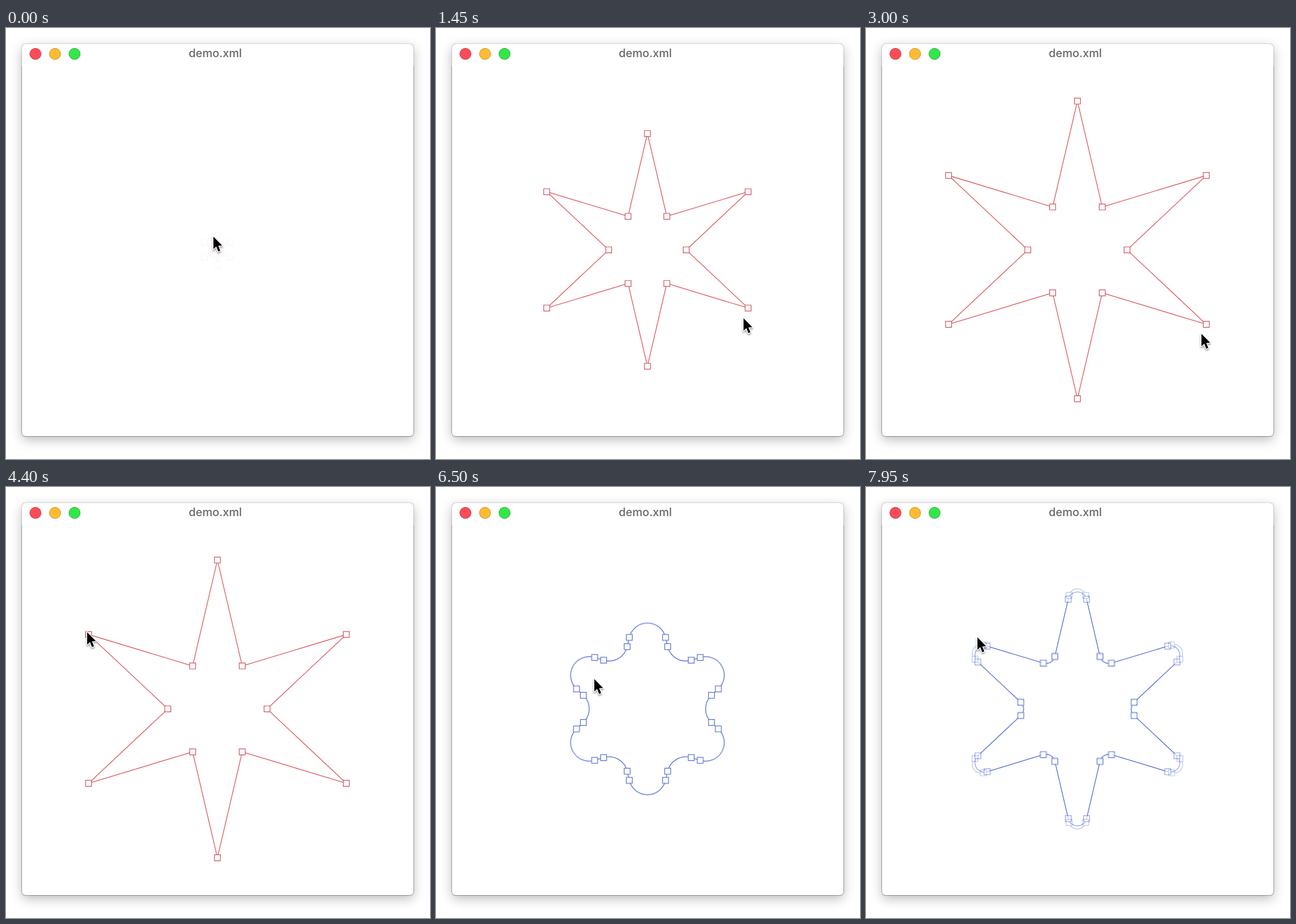
These frames come from a looping animation (742x754 px, 8000 ms). An HTML page:

```html
<!DOCTYPE html>
<html lang="en">
<head>
<meta charset="utf-8">
<title>Star editor</title>
<style>
  html, body { margin: 0; width: 100%; height: 100%; overflow: hidden; background: #fff; }
  #window {
    position: absolute; left: 28px; top: 28px; width: 685px; height: 686px;
    border-radius: 6px; background: #fff;
    box-shadow: 0 0 1.5px rgba(0,0,0,.6), 0 1px 1px rgba(0,0,0,.25), 0 6px 20px rgba(0,0,0,.27);
  }
  svg { position: absolute; left: 0; top: 0; }
  .layer path { fill: #fff; stroke-width: 1.2; }
  .layer .line { fill: none; stroke-width: 1.35; }
  text { font: 500 19.8px Inter, "Liberation Sans", sans-serif; fill: #666; text-anchor: middle; }
  #cursor { stroke: #fff; stroke-width: 2.8; paint-order: stroke; stroke-linejoin: round; filter: drop-shadow(0 2px 1.5px rgba(0,0,0,.4)); }
</style>
</head>
<body>
<div id="window"></div>
<svg width="742" height="754" viewBox="0 0 742 754">
  <circle cx="51.5" cy="45.3" r="9.8" fill="#fa4c56" stroke="#d03040"/>
  <circle cx="85.8" cy="45.3" r="9.8" fill="#fdbb33" stroke="#cc9230"/>
  <circle cx="120" cy="45.3" r="9.8" fill="#34e748" stroke="#28aa3c"/>
  <text x="366.3" y="51">demo.xml</text>
  <path d="M27.5 67V709M713.5 67V709" stroke="#000" stroke-opacity=".2"/>
  <g class="layer"><path class="line"/><path/></g>
  <g class="layer" opacity=".38"><rect x="100" y="100" width="540" height="580" fill="#fff"/><path class="line"/><path/></g>
  <path id="cursor" d="M0 0V20.5L4.7 16.2L8 24.5L11.3 23L8 15L14.5 14.7Z"/>
</svg>
<script>
const LOOP = 8000, STEP = 50, CX = 370, CY = 388.2, POINTS = 6;
const [current, next] = document.querySelectorAll('.layer');
const cursor = document.getElementById('cursor');

const easeIn = u => 1 - Math.cos(u * Math.PI / 2);
const easeOut = u => Math.sin(u * Math.PI / 2);
const easeInOut = u => u * u * (3 - 2 * u);

// Each move: start, end, easing, value to reach
const size = { from: [26], moves: [[267, 2430, easeOut, 260.4]] };
const rounding = { from: [0], moves: [
  [4850, 5700, easeIn, 15.7],
  [5700, 6650, easeOut, 33],
  [7200, 8700, easeInOut, 0]
] };
const pointer = { from: [363, 365], moves: [
  [0, 267, easeIn, 386, 423],
  [267, 2430, easeOut, 587, 535],
  [3250, 4100, easeInOut, 142, 254],
  [4800, 5700, easeIn, 226, 300],
  [5700, 6500, easeOut, 277, 336],
  [7200, 8700, easeInOut, 113, 190]
] };

function valueAt({ from, moves }, t) {
  return moves.reduce((value, [start, end, ease, ...to]) => {
    const k = ease(Math.min(1, Math.max(0, (t - start) / (end - start))));
    return value.map((v, i) => v + (to[i] - v) * k);
  }, from);
}

function starPoints(R) {
  return Array.from({ length: POINTS * 2 }, (_, i) => {
    const a = i * Math.PI / POINTS, d = i % 2 ? R / 3 : R;
    return [CX + d * Math.sin(a), CY - d * Math.cos(a)];
  });
}

function toward(p, q, d) {
  const k = d / Math.hypot(q[0] - p[0], q[1] - p[1]);
  return [p[0] + (q[0] - p[0]) * k, p[1] + (q[1] - p[1]) * k];
}

function halfAngle(a, p, b) {
  const turn = Math.atan2(a[1] - p[1], a[0] - p[0]) - Math.atan2(b[1] - p[1], b[0] - p[0]);
  return Math.acos(Math.cos(turn)) / 2;
}

const square = ([x, y]) => `M${x - 5.2} ${y - 5.2}h10.4v10.4h-10.4z`;

function drawStar(layer, R, r) {
  const pts = starPoints(R), n = pts.length;
  let line = '', handles = '';
  pts.forEach((p, i) => {
    const a = pts[(i + n - 1) % n], b = pts[(i + 1) % n];
    const cut = r / Math.tan(halfAngle(a, p, b));
    const from = toward(p, a, cut), to = toward(p, b, cut);
    line += (i ? 'L' : 'M') + from;
    if (r) line += `A${r} ${r} 0 0 ${1 - i % 2} ${to}`;
    handles += square(from) + (r ? square(to) : '');
  });
  const [outline, boxes] = layer.querySelectorAll('path');
  outline.setAttribute('d', line + 'Z');
  boxes.setAttribute('d', handles);
  outline.setAttribute('stroke', r ? '#5670d6' : '#dc5d62');
  boxes.setAttribute('stroke', r ? '#526bce' : '#c9505c');
}

function frame(now) {
  const t = Math.floor(now % LOOP / STEP) * STEP;
  const [R] = valueAt(size, t), [r] = valueAt(rounding, t), [x, y] = valueAt(pointer, t);
  drawStar(current, R, r);
  current.setAttribute('opacity', t ? 1 : .05);
  // Neighbouring poses blend while the corners are round
  next.style.display = r ? '' : 'none';
  if (r) drawStar(next, R, valueAt(rounding, t + STEP)[0]);
  cursor.setAttribute('transform', `translate(${x} ${y}) scale(1.06)`);
  requestAnimationFrame(frame);
}
frame(0);
</script>
</body>
</html>
```
